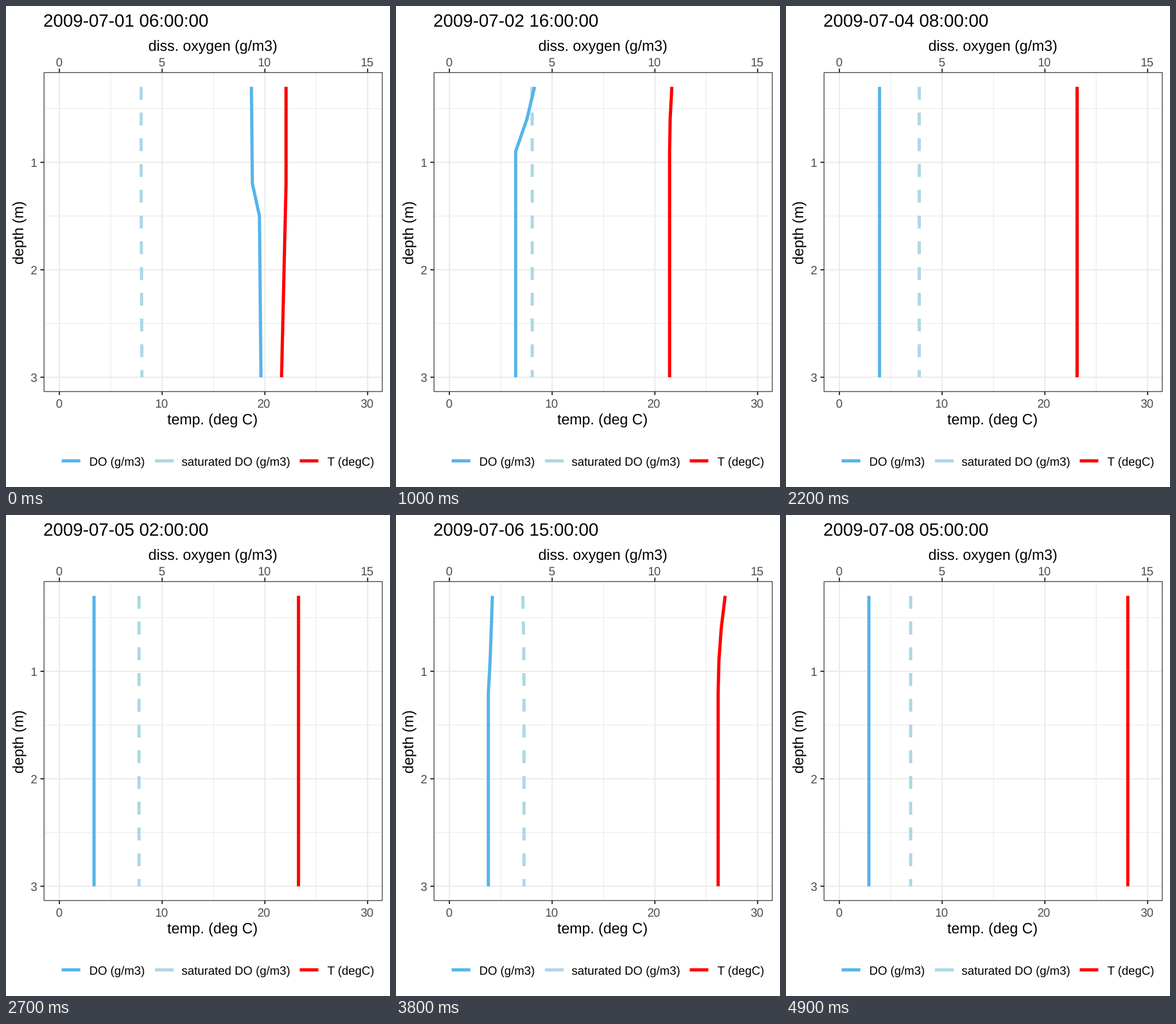
A matplotlib script for the animation above (5000 ms loop, 669x837 px).

```python
import matplotlib.pyplot as plt
import numpy as np
from matplotlib.animation import FuncAnimation
from matplotlib.patches import Rectangle

WIDTH, HEIGHT, DPI = 669, 837, 72  # at 72 dpi one point is one pixel
FRAMES, INTERVAL = 50, 100
LAST_HOUR = 167
LEFT, RIGHT, TOP, BOTTOM = 66.3, 655.5, 115.8, 670.9

BLUE, PALE, RED = "#56B4E9", "#ADD8E6", "#FF0000"
DARK, GREY, GRID = "#333333", "#4D4D4D", "#EBEBEB"
LINE = 5.6
TITLE, LABEL, SMALL = 31, 25.8, 20.7

plt.rcParams["font.family"] = "Liberation Sans"
plt.rcParams["text.hinting"] = "none"

DEPTHS = np.arange(0.3, 3.01, 0.3)

# The mixed water column over time
HOURS = [0, 34, 57, 92, 115, 143, 167]
MIXED_TEMP = [22.09, 21.46, 23.04, 23.3, 25.95, 26.42, 28.1]
MIXED_OXYGEN = [9.36, 3.24, 2.22, 1.7, 1.89, 1.93, 1.45]


def surface_layer(hour):
    """Share of the daytime surplus at each depth, 1 at the top of the layer."""
    thickness = np.interp(hour, [34, 57], [0.9, 1.2])
    return np.clip((thickness - DEPTHS) / (thickness - DEPTHS[0]), 0, 1)


def profiles(hour):
    """Temperature and oxygen at all depths: mixed, warmed by day from above."""
    daylight = max(0, np.sin(np.pi * ((hour + 6) % 24 - 8) / 16))
    morning = max(0, 1 - hour / 12)
    layer = surface_layer(hour)

    temp = np.interp(hour, HOURS, MIXED_TEMP)
    temp = temp + daylight * np.interp(hour, [34, 57], [0.22, 0.7]) * layer**2
    temp -= morning * 0.244 * np.maximum(DEPTHS - 1.2, 0)

    oxygen = np.interp(hour, HOURS, MIXED_OXYGEN)
    oxygen = oxygen + daylight * np.interp(hour, [34, 57, 81], [0.92, 1.2, 0.2]) * layer**0.75
    oxygen += morning * (0.05 * (DEPTHS - 0.3) + 0.33 * (DEPTHS > 1.35))
    return temp, oxygen


def saturation(temp):
    return 4.03 - 0.085 * (temp - 21.65)


def temp_x(value):
    return 92.5 + 17.9 * value


def oxygen_x(value):
    return temp_x(2 * value)


def depth_y(depth):
    return 271.7 + 187.2 * (depth - 1)


fig = plt.figure(figsize=((WIDTH + 1e-6) / DPI, (HEIGHT + 1e-6) / DPI),
                 dpi=DPI, facecolor="white")
ax = fig.add_axes([0, 0, 1, 1])
ax.set(xlim=(0, WIDTH), ylim=(HEIGHT, 0))
ax.axis("off")


def stroke(xs, ys, color, width, **kwargs):
    return ax.plot(xs, ys, color=color, lw=width, solid_capstyle="butt", **kwargs)[0]


def write(x, y, text, size, color="black", ha="center", **kwargs):
    return ax.text(x, y, text, fontsize=size, color=color, ha=ha,
                   va="baseline", **kwargs)


def draw_panel():
    for temp in (5, 15, 25):
        stroke([temp_x(temp)] * 2, [TOP, BOTTOM], GRID, 1.2, zorder=1)
    for depth in (0.5, 1.5, 2.5):
        stroke([LEFT, RIGHT], [depth_y(depth)] * 2, GRID, 1.2, zorder=1)
    for temp in (0, 10, 20, 30):
        x = temp_x(temp)
        stroke([x, x], [TOP, BOTTOM], GRID, 2.3, zorder=1)
        stroke([x, x], [TOP - 6.5, TOP], DARK, 2.2)
        stroke([x, x], [BOTTOM, BOTTOM + 6.5], DARK, 2.2)
        write(x - 1, 105, str(temp // 2), SMALL, GREY)
        write(x - 1, 699, str(temp), SMALL, GREY)
    for depth in (1, 2, 3):
        y = depth_y(depth)
        stroke([LEFT, RIGHT], [y, y], GRID, 2.3, zorder=1)
        stroke([LEFT - 6.5, LEFT], [y, y], DARK, 2.2)
        write(54, y + 7.8, str(depth), SMALL, GREY, ha="right")
    ax.add_patch(Rectangle((LEFT, TOP), RIGHT - LEFT, BOTTOM - TOP, fill=False,
                           ec=DARK, lw=1.3, zorder=5, snap=False))


def draw_labels():
    write(360, 78.6, "diss. oxygen (g/m3)", LABEL)
    write(360, 728.3, "temp. (deg C)", LABEL)
    write(31.7, 393.5, "depth (m)", LABEL, rotation=90, rotation_mode="anchor")
    for key_x, text_x, color, name in (
            (97, 145, BLUE, "DO (g/m3)"),
            (259.5, 306.4, PALE, "saturated DO (g/m3)"),
            (511.7, 560, RED, "T (degC)")):
        stroke([key_x, key_x + 32.5], [791.5] * 2, color, LINE, snap=False)
        write(text_x, 799.3, name, SMALL, ha="left")


draw_panel()
draw_labels()
title = write(65, 36, "", TITLE, ha="left")
ys = depth_y(DEPTHS)
saturated_line = stroke(ys, ys, PALE, LINE, zorder=3, snap=False,
                        linestyle=(0, (4, 4)), dash_capstyle="butt")
oxygen_line = stroke(ys, ys, BLUE, LINE, zorder=4, snap=False)
temp_line = stroke(ys, ys, RED, LINE, zorder=4, snap=False)


def update(frame):
    hour = frame * LAST_HOUR // (FRAMES - 1)
    day, clock = divmod(hour + 6, 24)
    title.set_text(f"2009-07-{day + 1:02d} {clock:02d}:00:00")
    temp, oxygen = profiles(hour)
    temp_line.set_xdata(temp_x(temp))
    oxygen_line.set_xdata(oxygen_x(oxygen))
    saturated_line.set_xdata(oxygen_x(saturation(temp)))
    return title, saturated_line, oxygen_line, temp_line


anim = FuncAnimation(fig, update, frames=FRAMES, interval=INTERVAL,
                     repeat=True, repeat_delay=0, blit=False)
plt.show()
```
